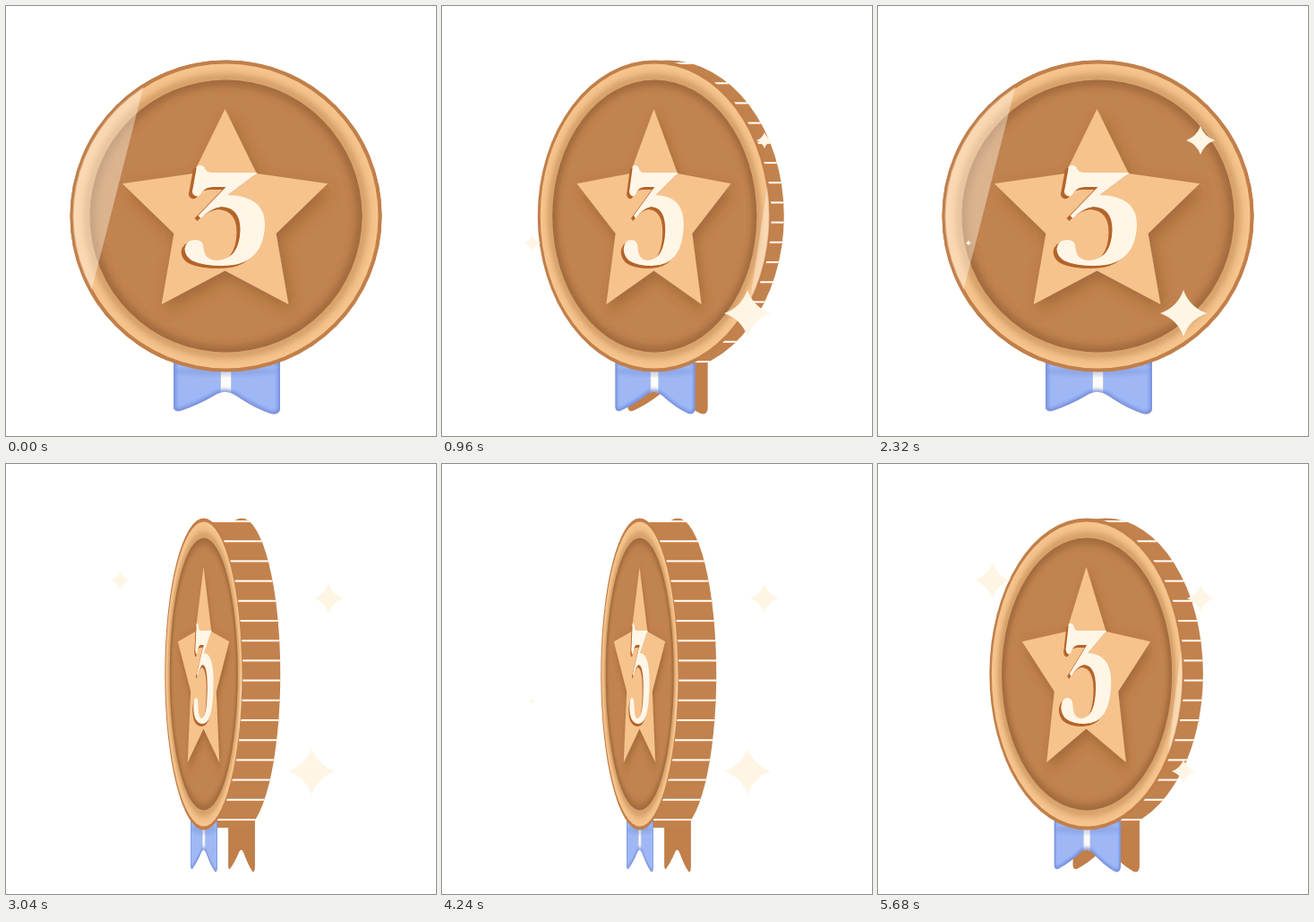
Recreate the animation shown at these times as an HTML page. Size 480 by 480 pixels, loop 5.76 s.

```html
<!DOCTYPE html>
<html lang="en">
<head>
<meta charset="utf-8">
<title>Bronze medal</title>
<style>
  html, body { margin: 0; width: 100%; height: 100%; overflow: hidden; background: #fff; }
  svg { display: block; width: 100vw; height: 100vh; }
</style>
</head>
<body>
<svg viewBox="0 0 480 480">
  <defs>
    <filter id="soft" x="-20%" y="-20%" width="140%" height="140%"><feGaussianBlur stdDeviation="4"/></filter>
    <filter id="edge" x="-20%" y="-20%" width="140%" height="140%"><feGaussianBlur stdDeviation="2"/></filter>
    <filter id="drop" x="-30%" y="-30%" width="160%" height="160%">
      <feDropShadow dx="4" dy="7" stdDeviation="8" flood-color="#7c4416" flood-opacity=".42"/>
    </filter>
    <path id="tails" d="M-58.5 396V448Q-58 453 -51 452Q-30 445 -10 433Q0 428 10 434Q32 449 50 455Q60 457 60.500 449V396Z"/>
    <path id="digit" d="M-32.500 179Q-28-179 -32.500 179Q-28 176 -24 180Q-22 186 -16 186H35.500L2 211Q43.500 212 43.500 244Q42 290 -4 290Q-46 290 -46 271Q-44 261 -35 261Q-25 261 -25 270Q-24 284 -9 284Q15 282 16 250Q16 225 -5 224Q-18 226 -28 237L-31 234L0 202H-14Q-23 202 -27 208Q-29 213 -34 212Q-39 210 -37 204Z"/>
    <clipPath id="tailClip"><use href="#tails"/></clipPath>
    <clipPath id="ringClip"><circle cy="234.500" r="171"/></clipPath>
    <clipPath id="dishClip"><circle cy="234.500" r="152"/></clipPath>
    <clipPath id="bodyClip"><ellipse id="bodyEnd" cy="234.500" ry="174"/><rect id="bodyFill" y="63" height="343"/></clipPath>
  </defs>

  <g id="back"><use href="#tails" fill="#c17f4a"/></g>
  <g clip-path="url(#bodyClip)">
    <rect width="480" height="480" fill="#c1824d"/>
    <g id="ridges"></g>
  </g>

  <g id="face">
    <g clip-path="url(#tailClip)">
      <use href="#tails" fill="#9fb8f5"/>
      <rect x="-6" y="396" width="12" height="40" fill="#fdfcfa"/>
      <path d="M-6 396V433M6 396V433" stroke="#b9c5e6" stroke-width="1"/>
      <use href="#tails" fill="none" stroke="#7089db" stroke-width="5" filter="url(#edge)"/>
      <ellipse cy="408" rx="60" ry="5" fill="#6c83c9" opacity=".3" filter="url(#edge)"/>
    </g>
    <circle cy="234.500" r="174" fill="#c17f4a"/>
    <circle cy="234.500" r="170" fill="#f6c48d"/>
    <g clip-path="url(#ringClip)">
      <circle cy="234.500" r="154" fill="none" stroke="#a96e39" stroke-width="8" opacity=".6" filter="url(#soft)"/>
    </g>
    <circle cy="234.500" r="152" fill="#c1834f"/>
    <g clip-path="url(#dishClip)">
      <circle cy="234.500" r="152" fill="none" stroke="#8d5a30" stroke-width="12" opacity=".65" filter="url(#soft)"/>
    </g>
    <path id="star" fill="#f6c38d" filter="url(#drop)"/>
    <use href="#digit" x="-4" y="3" fill="#b4642a"/>
    <use href="#digit" fill="#fff6e7"/>
    <g clip-path="url(#ringClip)"><path id="shine" fill="#fff6e8" opacity=".42"/></g>
  </g>
  <g id="sparkles" fill="#fff5e4"></g>
</svg>
<script>
const STEP = 80, FRAMES = 72, SPIN = 15, TWINKLE = 8;
const CX = 245.5;
const $ = id => document.getElementById(id);
const set = (el, attrs) => { for (const k in attrs) el.setAttribute(k, attrs[k]); };
const add = (parent, tag, attrs) => {
  const el = document.createElementNS('http://www.w3.org/2000/svg', tag);
  set(el, attrs);
  return parent.appendChild(el);
};

// Centre and radius for each twinkle step
const sparkles = [
  { x: 101, y: 264.5, r: [0, 0, 3, 9, 9, 3, 0, 0] },
  { x: 360, y: 150, r: [0, 0, 0, 0, 9, 16, 16.5, 15] },
  { x: 341, y: 343, r: [0, 0, 3, 14, 26, 26, 26, 13] },
  { x: 127.5, y: 130, r: [0, 0, 0, 0, 0, 1, 10.5, 20] }
];
for (const s of sparkles) {
  s.el = add($('sparkles'), 'path', {
    d: 'M0-1Q.26-.26 1 0Q.26 .26 0 1Q-.26 .26-1 0Q-.26-.26 0-1Z'
  });
}

for (let i = 0; i < 16; i++) {
  const y = 64 + i * 22.2;
  add($('ridges'), 'rect', { y: y + .6, width: 480, height: 1.6, fill: '#d9803f' });
  add($('ridges'), 'rect', { y: y - 1, width: 480, height: 2, fill: '#fff' });
}

const points = Array.from({ length: 10 }, (_, i) => {
  const r = i % 2 ? 60 : 120.5, a = i * Math.PI / 5;
  return [-1 + r * Math.sin(a), 235.5 - r * Math.cos(a)].map(v => v.toFixed(2));
});
$('star').setAttribute('d', 'M' + points.join('L') + 'Z');

function shinePath(p) {
  if (p < 6 || p === 14) {
    const shift = p === 14 ? 0 : p * 20;
    return `M${-69 - shift} 0L${-191.5 - shift} 480H-400V0Z`;
  }
  const x = 176 - Math.max(0, p - 7) * 1.8;
  return `M${x + 41} 0L${x - 55} 480H400V0Z`;
}

function drawMedal(p) {
  const right = p < 6;
  const w = right ? 1 - p / 6 : Math.min(1, (p - 6) / 8);
  const xl = CX - 33 * (1 - w), xr = CX + 23 * (1 - w);
  const front = right ? xr : xl, rear = right ? xl : xr;
  const sx = Math.max(w, .004);
  set($('back'), { transform: `translate(${rear} 0) scale(${sx} 1)` });
  set($('face'), { transform: `translate(${front} 0) scale(${sx} 1)` });
  set($('bodyEnd'), { cx: rear, rx: 174 * sx });
  set($('bodyFill'), { x: xl, width: xr - xl });
  $('shine').setAttribute('d', shinePath(p));
}

function drawSparkles(p) {
  for (const { el, x, y, r } of sparkles) {
    set(el, { transform: `translate(${x} ${y}) scale(${r[p]})`, display: r[p] ? 'inline' : 'none' });
  }
}

let last = -1;
function tick() {
  const n = Math.floor(performance.now() / STEP) % FRAMES;
  if (n !== last) {
    drawMedal(n % SPIN);
    drawSparkles(n % TWINKLE);
    last = n;
  }
  requestAnimationFrame(tick);
}
tick();
</script>
</body>
</html>
```
